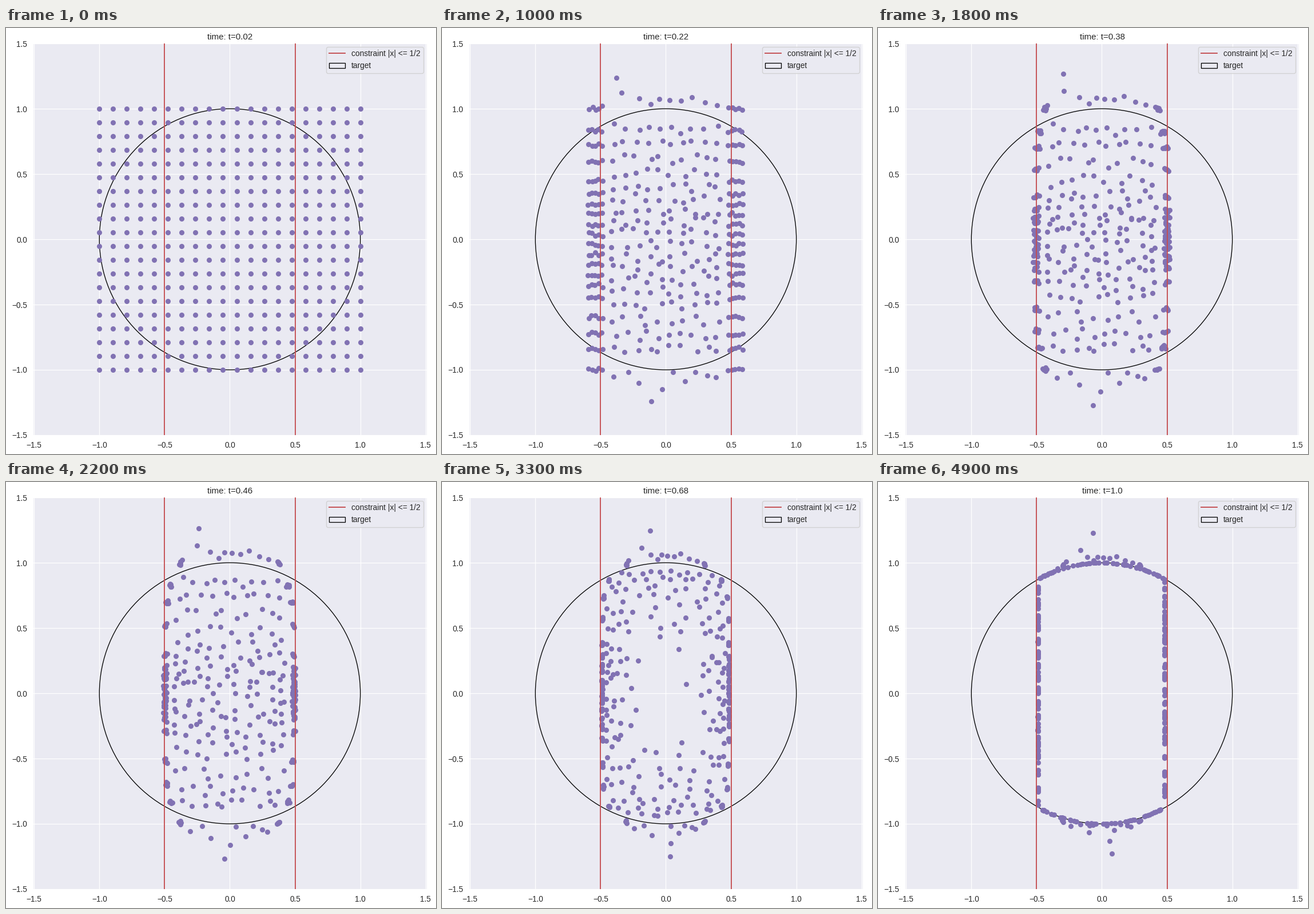
Animation of 752 by 744 pixels, one loop 5 s. Source, as a matplotlib script:

```python
import numpy as np
import matplotlib.pyplot as plt
from matplotlib.animation import FuncAnimation
from matplotlib.patches import Circle

FRAMES, INTERVAL, SIDE = 50, 100, 20
INK, PANEL, RED, VIOLET = "#262626", "#eaeaf2", "#c44e52", "#8172b3"
HALF_WIDTH = .485      # where particles settle inside the constraint
SHOULDER = .58         # columns beyond this are squeezed onto the constraint

axis = np.linspace(-1, 1, SIDE)
x0, y0 = np.meshgrid(axis, axis[::-1])
rng = np.random.default_rng(7)
jitter_x, jitter_y = rng.uniform(-1, 1, (2, SIDE, SIDE))
middle = 1 - np.clip((np.abs(x0) - .4) / .2, 0, 1)
rim = np.abs(y0) ** 20                               # top and bottom rows
core = 1 / (1 + (np.abs(y0) / .64) ** 12)            # rows that bunch up


def ramp(frame, start, end):
    u = np.clip((frame - start) / (end - start), 0, 1)
    return u * u * (3 - 2 * u)


def bump(x, centre, width):
    return np.exp(-((x - centre) / width) ** 2)


# A few rim particles escape upwards on the left and downwards near the centre.
escape = rim * np.where(y0 > 0, .21 * bump(x0, -.46, .09),
                        .2 * bump(x0, -.13, .09))


def squeeze(frame):
    """Pull outer columns exponentially to the constraint."""
    shoulder = HALF_WIDTH + (SHOULDER - HALF_WIDTH) * np.exp(-.4 * frame)
    inner = shoulder * np.minimum(np.abs(x0) / SHOULDER, 1)
    outer = np.maximum(np.abs(x0) - SHOULDER, 0) * np.exp(-.14 * frame)
    pinch = .38 * ramp(frame, 8, 32) * np.abs(y0) ** 8
    return np.sign(x0) * (inner + outer) * (1 - pinch)


def bunch(frame, settle):
    """Gather the rows towards the centre and let them spread again."""
    gather = np.sin(np.pi * min(frame, 48) / 48) ** 2 * (.55 - .33 * middle)
    spread = settle * ((.08 + .06 * middle) * rim - .08)
    rise = .07 * ramp(frame, 25, 49) * (1 - y0 ** 2)
    return y0 * (1 - gather * core + spread) + rise


def expel(x, y, frame):
    """Empty the interior by pushing particles to the edge of the safe set."""
    power = (1 - np.clip((frame - 20) / 29, 0, 1)) ** 1.5
    reach = np.maximum(np.abs(x) / HALF_WIDTH, np.hypot(x, y))
    grow = reach ** ((power - 1) * np.where(reach < 1, 1, .5))
    return x * grow, y * grow


def positions(frame):
    settle = 1 - np.exp(-frame / 5)
    x = squeeze(frame) + settle * jitter_x * (.004 + .03 * middle)
    y = bunch(frame, settle) + settle * jitter_y * (.016 + .03 * middle)
    x, y = expel(x, y, frame)
    y = y + np.sign(y0) * settle * escape
    x = x + .15 * ramp(frame, 6, 49) * escape / .2
    return (x - .004 * settle).ravel(), y.ravel()


plt.rcParams.update({"font.family": "Liberation Sans", "text.color": INK})
W, H = 752, 744
LEFT, RIGHT, TOP, BOTTOM = 48, 736, 27, 711
CENTRE, UNIT = 391.5, 228.2
fig = plt.figure(figsize=(7.52, 7.44), dpi=100, facecolor="white")
ax = fig.add_axes([LEFT / W, 1 - BOTTOM / H, (RIGHT - LEFT) / W,
                   (BOTTOM - TOP) / H], facecolor=PANEL)
ax.set_xlim((LEFT - CENTRE) / UNIT, (RIGHT - CENTRE) / UNIT)
ax.set_ylim(-1.5, 1.5)
ticks = np.arange(-1.5, 1.6, .5)
ax.set_xticks(ticks)
ax.set_yticks(ticks)
ax.tick_params(length=0, pad=8, labelsize=9.8, labelcolor=INK)
ax.grid(color="white", linewidth=.9)
ax.set_axisbelow(True)
ax.spines[:].set_visible(False)

ax.axvline(-.5, color=RED, linewidth=1.35, label="constraint |x| <= 1/2")
ax.axvline(.5, color=RED, linewidth=1.35)
ax.add_patch(Circle((0, 0), 1, fill=False, edgecolor="black", linewidth=.95,
                    zorder=1, label="target"))
dots, = ax.plot([], [], "o", color=VIOLET, markersize=6.5,
                markeredgewidth=0, zorder=1.5)
ax.legend(loc="upper right", fontsize=9.9, facecolor=PANEL,
          edgecolor="0.8", framealpha=.8, borderaxespad=.42)
title = ax.set_title("", fontsize=10.8, pad=5.4)


def update(frame):
    dots.set_data(*positions(frame))
    title.set_text(f"time: t={round(.02 * (frame + 1), 2)}")
    return dots, title


anim = FuncAnimation(fig, update, frames=FRAMES, interval=INTERVAL,
                     repeat=True, repeat_delay=0)
plt.show()
```
